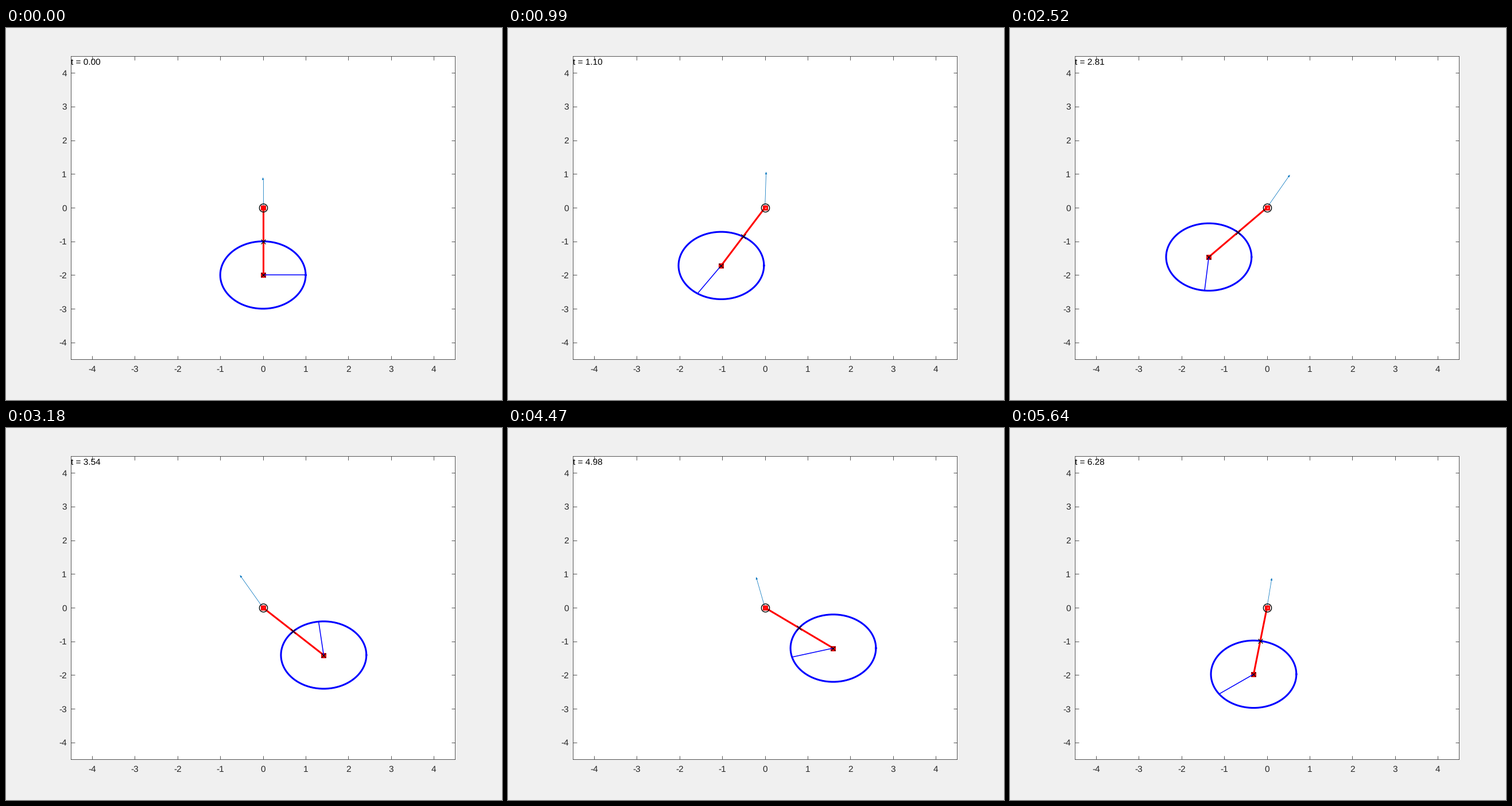
Recreate the animation shown at these times as a matplotlib script. Size 864 by 648 pixels, loop 5670 ms.

```python
import numpy as np
import matplotlib.pyplot as plt
from matplotlib.animation import FuncAnimation
from matplotlib.markers import MarkerStyle

# 72 dpi, so one point is one pixel
W, H, DPI = 864, 648, 72
N, STEP = 189, 30
PT = W / 560
FONT = 10 * PT
INK = "0.15"

plt.rcParams.update({
    "font.family": "Liberation Sans",
    "font.size": FONT,
    "text.hinting": "none",
})

# Uniform rod with a ring-shaped wheel at its end; a motor torque
# spins the wheel and reacts on the rod.
G, M, L, R = 9.8, 1.0, 2.0, 1.0
HUB = 0.15  # inertia of the pivot
INERTIA = M * L**2 / 3 + M * L**2 + HUB
MOMENT = M * L / 2 + M * L
WEIGHT = 2 * M * G
TORQUE = 2 * M * G * R


def rod_accel(t, th):
    return -(MOMENT * G * np.sin(th) + TORQUE * np.sin(t)) / INERTIA


def deriv(t, s):
    return np.array([s[1], rod_accel(t, s[0])])


def solve(times, sub=6):
    s = np.zeros(2)
    out = [s]
    h = (times[1] - times[0]) / sub
    for t0 in times[:-1]:
        for j in range(sub):
            t = t0 + j * h
            k1 = deriv(t, s)
            k2 = deriv(t + h / 2, s + h / 2 * k1)
            k3 = deriv(t + h / 2, s + h / 2 * k2)
            k4 = deriv(t + h, s + h * k3)
            s = s + h / 6 * (k1 + 2 * k2 + 2 * k3 + k4)
        out.append(s)
    return np.array(out)


times = np.linspace(0, 2 * np.pi, N)
theta, omega = solve(times).T
accel = rod_accel(times, theta)
spin = TORQUE / (M * R**2) * (times - np.sin(times))

# Pivot reaction relative to the total weight
sin, cos = np.sin(theta), np.cos(theta)
force_x = 0.9 * MOMENT * (accel * cos - omega**2 * sin) / WEIGHT
force_y = 0.9 * (1 + MOMENT * (accel * sin + omega**2 * cos) / WEIGHT)

fig = plt.figure(figsize=(W / DPI, H / DPI), dpi=DPI, facecolor="#f0f0f0")
box_w, box_h = 0.775 * W, 0.815 * H
ax = fig.add_axes([112.8 / W, 71 / H, box_w / W, box_h / H])
ax.set(xlim=(-4.5, 4.5), ylim=(-4.5, 4.5))
UNIT = np.array([box_w, box_h]) / 9

ticks = range(-4, 5)
names = [str(v) for v in ticks]
ax.set_xticks(ticks, names, va="baseline")
ax.set_yticks(ticks, names)
ax.tick_params(direction="in", top=True, right=True, length=6.5,
               width=0.5 * PT, color=INK, labelcolor=INK)
ax.tick_params(axis="x", pad=22)
ax.tick_params(axis="y", pad=7)
for spine in ax.spines.values():
    spine.set(linewidth=0.5 * PT, color=INK)


def line(color, width, **kw):
    return ax.plot([], [], color=color, lw=width * PT, **kw)[0]


BLUE, RED, SKY = (0, 0, 1), (1, 0, 0), (0, 0.447, 0.741)

shaft = line(SKY, 0.5, zorder=2)
head, = ax.fill([0, 0, 0], [0, 0, 0], color=SKY, lw=0, zorder=2)
rod = line(RED, 2, marker=MarkerStyle("s", joinstyle="round"), ms=4.4 * PT,
           mfc="none", mec=RED, mew=2 * PT, zorder=3)
rim = line(BLUE, 2, zorder=4)
spoke = line(BLUE, 1, zorder=4)
centres = line("k", 0, ls="", marker="x", ms=5 * PT, mec="k", mew=1.2,
               zorder=5)
ax.plot(0, 0, "o", ms=14.2, mfc="none", mec="k", mew=1.4, zorder=5)
clock = ax.text(-4.5, 4.5 - 15 / UNIT[1], "", color="k", va="baseline",
                zorder=6)

turn = np.linspace(0, 2 * np.pi, 181)
rim_x, rim_y = R * np.cos(turn), R * np.sin(turn)


def draw(i):
    x, y = L * sin[i], -L * cos[i]
    rod.set_data([0, x], [0, y])
    rim.set_data(x + rim_x, y + rim_y)
    spoke.set_data([x, x + R * np.cos(spin[i])], [y, y + R * np.sin(spin[i])])
    centres.set_data([x / 2, x], [y / 2, y])

    tip = np.array([force_x[i], force_y[i]]) * UNIT
    along = tip / np.hypot(*tip)
    side = np.array([-along[1], along[0]])
    base = tip - 4.5 * along
    head.set_xy(np.array([tip, base + 1.8 * side, base - 1.8 * side]) / UNIT)
    end = base / UNIT
    shaft.set_data([0, end[0]], [0, end[1]])

    clock.set_text(f"t = {times[i]:.2f}")
    return shaft, head, rod, rim, spoke, centres, clock


anim = FuncAnimation(fig, draw, frames=N, interval=STEP, repeat=True,
                     repeat_delay=0, blit=False)
plt.show()
```
